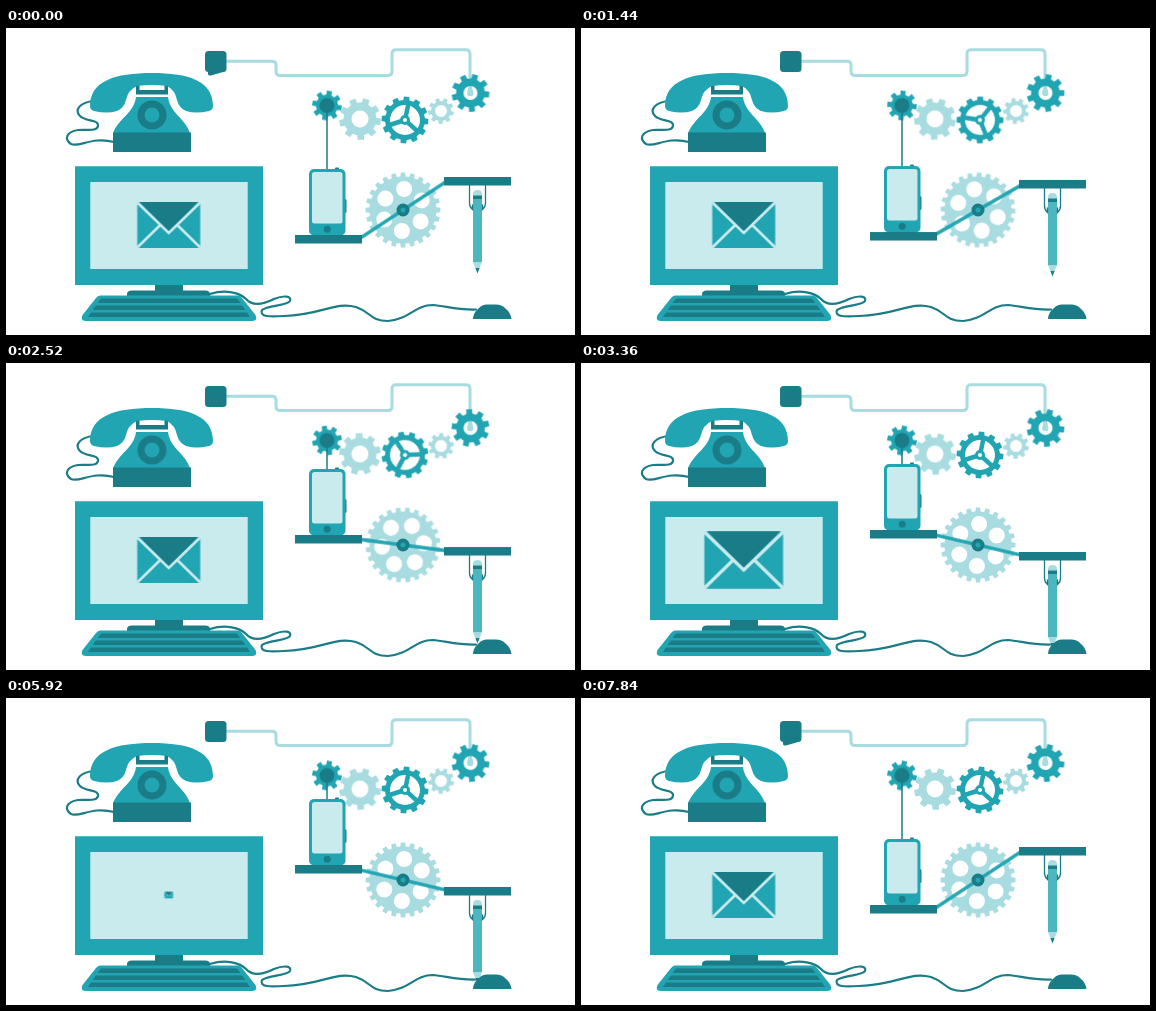
An HTML page that plays this animation: 569 px wide and 307 px high, repeating every 8 s.

```html
<!DOCTYPE html>
<html lang="en">
<head>
<meta charset="utf-8">
<title>Contact machine</title>
<style>
  html, body { margin: 0; width: 100%; height: 100%; overflow: hidden; background: #fff; }
  svg { display: block; width: 100%; height: 100%; }
  .teal { fill: #22a5b3; }
  .dark { fill: #1a7c86; }
  .light { fill: #a8dce0; }
  .pale { fill: #c9ebee; }
  .mid { fill: #4cb7c1; }
  .line { fill: none; stroke: #1a7c86; stroke-width: 2.2; stroke-linecap: round; }
  .wire { fill: none; stroke: #a8dce0; stroke-width: 3; stroke-linejoin: round; }
  .fold { fill: none; stroke: #c9ebee; stroke-width: 2.6; }

  .lift, .drop, .bar, .turn, .wheel, .mail, .handset, .cord, .flap {
    animation: 8s cubic-bezier(.37, 0, .63, 1) infinite;
  }
  .lift { --d: -40px; animation-name: shift; }
  .drop { --d: 40px; animation-name: shift; }
  .bar { animation-name: tilt; }
  .turn { animation-name: turn; }
  .wheel { animation-name: wheel; }
  .mail { animation-name: mail; }
  .handset { animation-name: handset; }
  .cord { animation-name: cord; }
  .flap { animation-name: flap; transform-origin: 218px 42px; }

  @keyframes shift {
    0%, 14%, 84%, 100% { transform: translateY(0); }
    36.75%, 74% { transform: translateY(var(--d)); }
  }
  @keyframes tilt {
    0%, 14%, 84%, 100% { transform: rotate(-33.3deg); }
    36.75%, 74% { transform: rotate(13.2deg); }
  }
  @keyframes turn {
    0%, 14%, 84%, 100% { transform: rotate(0deg); }
    36.75%, 74% { transform: rotate(var(--a)); }
  }
  @keyframes wheel {
    0%, 14%, 89%, 100% { transform: rotate(0deg); }
    36.75%, 74% { transform: rotate(-180deg); }
  }
  @keyframes mail {
    0%, 37% { transform: scale(1); }
    42% { transform: scale(1.25); }
    48%, 73.5% { transform: scale(0); }
    74% { transform: scale(.14); }
    79.5% { transform: scale(1.1); }
    84.5% { transform: scale(.97); }
    88%, 100% { transform: scale(1); }
  }
  @keyframes handset {
    0%, 3%, 16.5%, 100% { transform: translateY(0); }
    9.5%, 11% { transform: translateY(-20px); }
  }
  @keyframes cord {
    0%, 3%, 16.5%, 100% { d: path("M88 73C74 74 68 82 74 88C80 94 93 91 92 98C91 104 80 101 72 102C60 104 58 111 65 116C73 120 86 108 108 114"); }
    9.5%, 11% { d: path("M88 53C74 54 66 76 74 85C80 93 93 91 92 98C91 104 80 101 72 102C60 104 58 111 65 116C73 120 86 108 108 114"); }
  }
  @keyframes flap {
    0%, 7.5%, 84%, 100% { transform: rotate(0deg); }
    9.5%, 76% { transform: rotate(16deg); }
  }
</style>
</head>
<body>
<svg viewBox="0 0 569 307">
  <defs>
    <clipPath id="below"><path d="M310 77h22v100h-22z"/></clipPath>
  </defs>

  <!-- trigger and wire -->
  <path class="wire" d="M219 33.300H266Q270 33.300 270 37V43Q270 47.500 274 47.500H382Q386 47.500 386 43V26Q386 21.700 390 21.700H460Q464 21.700 464 26V65"/>
  <path class="light" d="M463 57H465.500L467.500 65A3.200 3.200 0 0 1 461 65Z"/>
  <path class="flap dark" d="M202 41H219L217 44L205 47.500Q202 48 202 46Z"/>
  <rect class="dark" x="199" y="23" width="21.500" height="21" rx="3.500"/>

  <!-- telephone -->
  <path class="line cord" d="M88 73C74 74 68 82 74 88C80 94 93 91 92 98C91 104 80 101 72 102C60 104 58 111 65 116C73 120 86 108 108 114"/>
  <path class="dark" d="M130 56h3.500v6h25v-6h3.500v10.500h-32z"/>
  <path class="teal" d="M130 69H162C164 85 179 90 184 105H107C113 90 128 85 130 69Z"/>
  <path class="dark" d="M107 104.500h78v19.500h-78z"/>
  <circle class="dark" cx="146" cy="87" r="14.500"/>
  <circle class="teal" cx="146" cy="87" r="7.500"/>
  <path class="handset teal" d="M84 78C84 53 109 45 146 45S207 53 207 78Q207 82 203 83Q190 86 180 83Q173 80 171 72Q169 62 161 58Q146 56 131 58Q122 62 120 72Q118 80 111 83Q101 86 88 83Q84 82 84 78Z"/>

  <!-- computer -->
  <path class="teal" d="M69 138.300H257V257H69Z"/>
  <path class="pale" d="M84.300 154H241.700V241H84.300Z"/>
  <path class="dark" d="M149 257h28v6h-28z"/>
  <path class="dark" d="M121 268V266Q121 262.500 126 262.500H199Q204 262.500 204 266V268Z"/>
  <g transform="translate(162.700 197)">
    <g class="mail">
      <rect class="teal" x="-31.500" y="-23" width="63" height="46" rx="3"/>
      <path class="fold" d="M-31 22L-8.500 0M31 22L8.500 0"/>
      <path class="dark" d="M-29-23H29L0 6.500Z"/>
      <path class="fold" d="M-31-22L0 8L31-22"/>
    </g>
  </g>
  <path class="line" d="M204 266C220 261 234 265 240 271C248 280 262 274 268 271C278 267 286 268 284 273C281 278 262 277 256 282C253 289 264 289 278 288C316 287 329 273 350 279C365 284 364 293 382 293C405 291 408 277 427 277C440 278 450 282 470 281.500"/>
  <path class="teal" d="M94 267.500H232Q234 267.500 236 270L249.500 287Q252 293 246 293H80Q74 293 76.500 287L90 270Q92 267.500 94 267.500Z"/>
  <path class="dark" d="M95 270.500H231L234.500 275H91.500ZM90 277.500H236L239.500 282H86.500ZM85 284.500H241L244 289H82Z"/>

  <g id="gears"></g>

  <!-- lift -->
  <g transform="translate(397 182)">
    <path id="wheel" class="wheel light" fill-rule="evenodd"/>
    <path class="bar" d="M-50 0H50" stroke="#22a5b3" stroke-width="3.400"/>
    <circle class="dark" r="6.500"/>
    <circle class="teal" r="2.500"/>
  </g>
  <g clip-path="url(#below)">
    <path class="lift line" d="M321 60V142" style="stroke-width:1.500"/>
  </g>
  <g class="lift">
    <rect class="dark" x="329" y="139.500" width="4" height="5" rx="1"/>
    <rect class="dark" x="337" y="171" width="3.500" height="14" rx="1.500"/>
    <rect class="teal" x="303" y="141" width="36.500" height="66.500" rx="5"/>
    <rect class="pale" x="306" y="144" width="30.500" height="51.500" rx="2.500"/>
    <circle class="dark" cx="321.200" cy="201.300" r="3.500"/>
    <path class="dark" d="M289 207h67v8.500h-67z"/>
  </g>

  <!-- pencil -->
  <g class="drop">
    <path class="light" d="M467 169V166Q467 162 471.500 162T476 166V169Z"/>
    <path class="mid" d="M467 170h9v64h-9z"/>
    <path class="dark" d="M467 167.500h9v3.500h-9z"/>
    <path class="light" d="M467 234H476L472.500 243H470.500Z"/>
    <path class="dark" d="M469.500 240H473.500L471.500 245.500Z"/>
    <path class="line" style="stroke-width:1.300" d="M463.500 157V175Q463.500 179 466.500 181.500V177M479.500 157V175Q479.500 179 476.500 181.500V177"/>
    <path class="dark" d="M438 149h67v8.500h-67z"/>
  </g>
  <path class="dark" d="M467 291Q467 285 473 280Q476 276.500 481 276.500H490Q496 276.500 499 280Q505 285 505.500 291Z"/>
</svg>
<script>
  const rad = Math.PI / 180;
  const at = (r, a) => `${(r * Math.cos(a)).toFixed(2)} ${(r * Math.sin(a)).toFixed(2)}`;
  const hole = (r, x = 0, y = 0) =>
    `M${x - r} ${y}a${r} ${r} 0 1 0 ${2 * r} 0a${r} ${r} 0 1 0 ${-2 * r} 0Z`;

  function teeth(n, outer, root, phase = 0) {
    const step = 2 * Math.PI / n, points = [];
    for (let i = 0; i < n; i++) {
      const a = i * step + phase * rad;
      for (const [r, k] of [[root, -.3], [outer, -.22], [outer, .22], [root, .3]])
        points.push(at(r, a + k * step));
    }
    return `M${points.join('L')}Z`;
  }

  // x, y, teeth, outer radius, root radius, hole, colour, phase
  const train = [
    [321, 77.5, 8, 15, 11, 0, 'teal', 10],
    [354, 91, 9, 21, 16.5, 8.5, 'light', 8],
    [399, 92, 12, 23.5, 20, 15, 'teal', 4],
    [435, 83, 9, 13, 10, 6, 'light', 12],
    [464.5, 65, 9, 19, 14.5, 7, 'teal', 5]
  ];
  const pitches = 12;

  document.getElementById('gears').innerHTML = train.map(([x, y, n, R, r, h, color, phase], i) => {
    const angle = (i % 2 ? -1 : 1) * pitches * 360 / n;
    let extra = '';
    if (i === 0) extra = '<circle class="dark" r="7.5"/>';
    if (i === 2) {
      const spokes = [-78, 42, 162].map(a => `M0 0L${at(17, a * rad)}`).join('');
      extra = `<path d="${spokes}" stroke="#22a5b3" stroke-width="4.5"/>
        <circle class="teal" r="5"/><circle r="2" fill="#fff"/>`;
    }
    return `<g transform="translate(${x} ${y})"><g class="turn" style="--a:${angle}deg">
      <path class="${color}" fill-rule="evenodd" d="${teeth(n, R, r, phase) + (h ? hole(h) : '')}"/>${extra}</g></g>`;
  }).join('');

  let wheel = teeth(24, 37.5, 33.5);
  for (let i = 0; i < 6; i++) {
    const a = (i * 60 - 27) * rad;
    wheel += hole(8, 21 * Math.cos(a), 21 * Math.sin(a));
  }
  document.getElementById('wheel').setAttribute('d', wheel);
</script>
</body>
</html>
```
